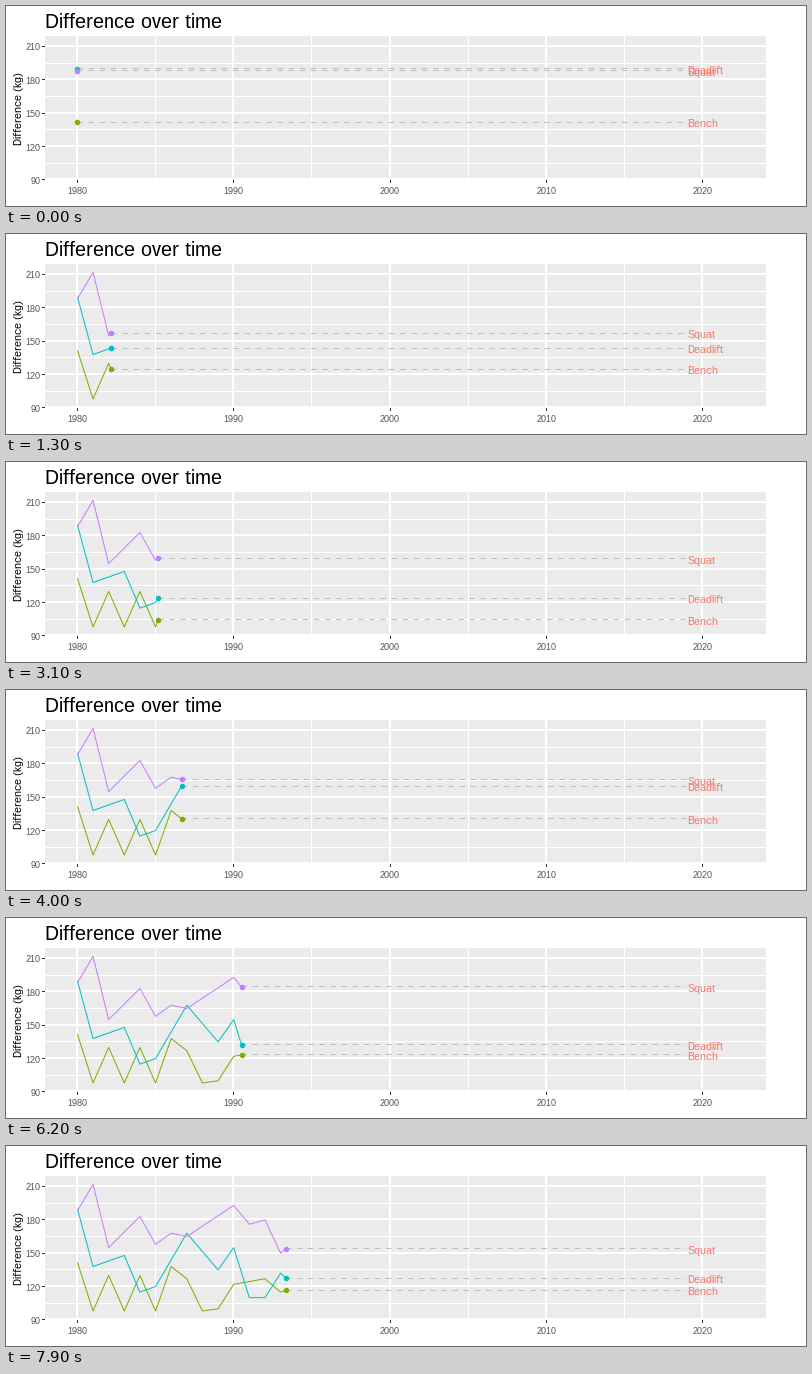
Recreate the animation shown at these times as a matplotlib script. Size 800 px wide and 200 px high, loop 8 s.

```python
import math

import matplotlib.pyplot as plt
import numpy as np
from matplotlib.animation import FuncAnimation
from matplotlib.patches import Rectangle

W, H, DPI = 800, 200, 100
FRAMES, INTERVAL = 80, 100
FRAMES_PER_YEAR = 229 / 39
FIRST, LAST = 1980, 2019
LEFT, RIGHT, TOP, BOTTOM = 39, 760, 30, 174

# Yearly turning points; "_" lies on the straight run between its neighbours.
_ = math.nan
ZIGZAG = [98, 130] * 2
LIFTS = {
    "Bench": ("#7CAE00",
              [142, *ZIGZAG, 98, 138, 127, 98, 100, 122, _, 127, 115, 120]),
    "Deadlift": ("#00BFC4",
                 [190, 138, _, 148, 115, 120, _, 168, _, 135, 155, 110, 110,
                  132, 118]),
    "Squat": ("#C77CFF",
              [188, 212, 155, _, 183, 158, 168, 165, _, _, 193, 176, 180,
               150, 162]),
}
YEARS = np.arange(FIRST, FIRST + 15)
# Each year is reached on a whole frame; the head moves evenly in between.
ARRIVALS = np.ceil((YEARS - FIRST) * FRAMES_PER_YEAR)

plt.rcParams.update({
    "font.family": "Liberation Sans",
    "text.hinting": "default",
    "text.hinting_factor": 1,
})


def px(year):
    return 71.4 + (np.asarray(year) - FIRST) * 15.63


def py(kg):
    return 40.5 + (210 - np.asarray(kg)) * 1.1115


def fill_runs(kgs):
    kgs = np.array(kgs, float)
    known = ~np.isnan(kgs)
    return np.interp(YEARS, YEARS[known], kgs[known])


fig = plt.figure(figsize=(W / DPI, H / DPI), dpi=DPI, facecolor="white")
ax = fig.add_axes([0, 0, 1, 1])
ax.set(xlim=(0, W), ylim=(H, 0))
ax.axis("off")


def line(xs, ys, color, width=1, **kw):
    return ax.plot(xs, ys, color=color, lw=width * 72 / DPI, snap=False,
                   solid_capstyle="butt", **kw)[0]


def rule(pos, start, end, color, width=1, vertical=False):
    """Straight line laid on whole pixels."""
    mid = math.floor(pos) + (0.5 if width == 1 else 0)
    along, across = [start, end], [mid, mid]
    xs, ys = (across, along) if vertical else (along, across)
    line(xs, ys, color, width)


def label(x, y, s, size, color, **kw):
    kw.setdefault("va", "baseline")
    return ax.text(x, y, s, fontsize=size * 72 / DPI, color=color, **kw)


def draw_axes():
    ax.add_patch(Rectangle((LEFT, TOP), RIGHT - LEFT, BOTTOM - TOP,
                           color="#EBEBEB", lw=0))
    for year in range(1985, 2020, 10):
        rule(px(year), TOP, BOTTOM, "white", vertical=True)
    for kg in range(105, 200, 30):
        rule(py(kg), LEFT, RIGHT, "white")
    for year in range(1980, 2021, 10):
        x = px(year)
        rule(x, TOP, BOTTOM, "white", 2, vertical=True)
        rule(x, BOTTOM, BOTTOM + 3, "#333333", vertical=True)
        label(x, 188, str(year), 9, "#4D4D4D", ha="center")
    for kg in range(90, 211, 30):
        y = py(kg)
        rule(y, LEFT, RIGHT, "white", 2)
        rule(y, LEFT - 3, LEFT, "#333333")
        label(34.5, y + 4, str(kg), 9, "#4D4D4D", ha="right")
    label(39, 22, "Difference over time", 20, "black")
    label(15.5, 102.5, "Difference (kg)", 11, "black", rotation=90,
          rotation_mode="anchor", ha="center")


class Lift:
    def __init__(self, name, color, kgs):
        self.kgs = fill_runs(kgs)
        self.trail = line([], [], color, zorder=3)
        self.leader = line([], [], "#BEBEBE", dashes=(4 / 0.72, 4 / 0.72),
                           dash_capstyle="butt", zorder=4)
        self.head = line([], [], color, marker="o", ms=5.5 * 72 / DPI, mew=0,
                         ls="none", zorder=5)
        self.name = label(px(LAST) + 0.6, 0, name, 11, "#F8766D", zorder=6)

    def move(self, year):
        x, y = px(year), py(np.interp(year, YEARS, self.kgs))
        past = YEARS < year
        self.trail.set_data([*px(YEARS[past]), x], [*py(self.kgs[past]), y])
        row = math.floor(y) + 0.5
        self.leader.set_data([x, px(LAST)], [row, row])
        self.head.set_data([x], [y])
        self.name.set_y(y + 5.1)


draw_axes()
lifts = [Lift(name, *spec) for name, spec in LIFTS.items()]


def update(i):
    year = np.interp(i, ARRIVALS, YEARS)
    for lift in lifts:
        lift.move(year)
    return []


anim = FuncAnimation(fig, update, frames=FRAMES, interval=INTERVAL,
                     repeat=True, repeat_delay=0)
plt.show()
```
